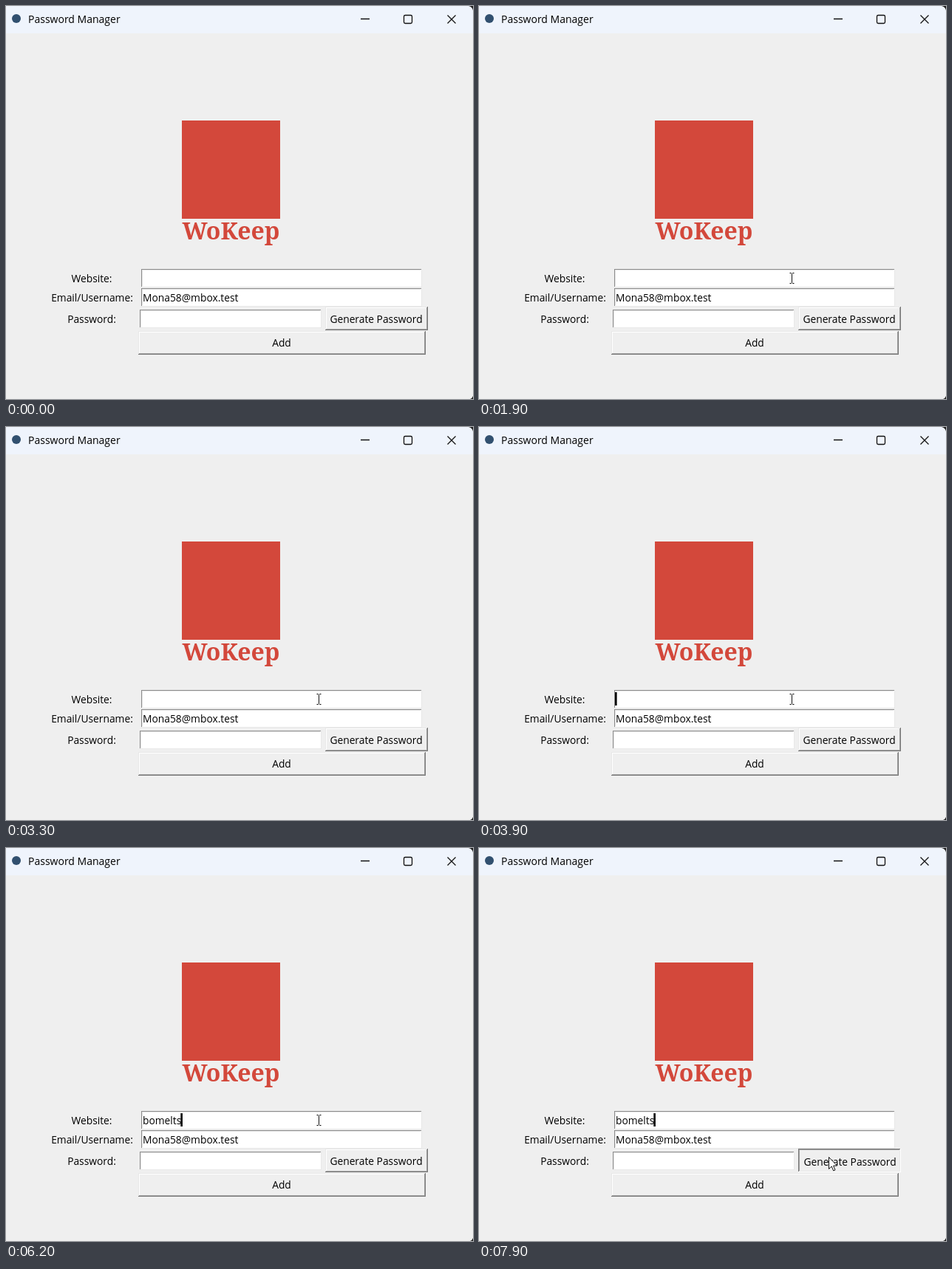
Recreate the animation shown at these times as an HTML page. Size 632 px wide and 532 px high, loop 8000 ms.

```html
<!DOCTYPE html>
<html lang="en">
<head>
<meta charset="utf-8">
<title>Password Manager</title>
<style>
html, body { margin: 0; width: 632px; height: 532px; overflow: hidden; background: #efefef; }
svg { display: block; font: 13.8px "Open Sans", "Noto Sans", sans-serif; }
.mid { text-anchor: middle; }
.brand { font: bold 32px "Noto Serif", serif; fill: #d3483b; }
.icon { fill: none; stroke: #111; stroke-width: 1.3; }
</style>
</head>
<body>
<svg width="632" height="532" viewBox="0 0 632 532">
  <rect width="632" height="532" fill="#efefef"/>
  <rect width="632" height="37" fill="#eff4fc"/>
  <path d="M626 0H632V6Q631 1 626 0ZM632 528V532H628Q631 531 632 528Z" fill="#222"/>
  <circle cx="14" cy="17" r="6" fill="#31506f"/>
  <text x="30" y="23" font-size="14">Password Manager</text>
  <path class="icon" d="M480 17.5H492M597.5 12.5L608.5 23.5M608.5 12.5L597.5 23.5"/>
  <rect class="icon" x="538.5" y="12.5" width="11" height="11" rx="1.8"/>

  <rect x="238" y="155" width="133" height="133" fill="#d3483b"/>
  <text class="mid brand" x="304.5" y="316">WoKeep</text>

  <g class="mid">
    <text x="116" y="374">Website:</text>
    <text x="116.5" y="400">Email/Username:</text>
    <text x="116" y="429">Password:</text>
  </g>
  <g id="widgets"></g>
  <g id="pressed"></g>
  <text x="185" y="400">Mona58@mbox.test</text>
  <text id="site" x="185" y="374"></text>
  <rect id="caret" y="359" width="2.6" height="18"/>
  <text class="mid" x="373" y="461">Add</text>
  <text id="generate" class="mid" x="501" y="429">Generate Password</text>

  <path id="arrow" d="M0 0V16L3.7 12.5L6.2 18.3L8.5 17.3L6.1 11.6H11Z" fill="#fff" stroke="#111"/>
  <path id="beam" d="M-3 -7H-1L0 -6L1 -7H3M0 -6V6M-3 7H-1L0 6L1 7H3" fill="none" stroke="#111"/>
</svg>
<script>
const $ = id => document.getElementById(id);
const LOOP = 8000, FOCUS = 3850, PRESS = 7700;
const WORD = "bomelts";
const KEYS = [4300, 4500, 4700, 4900, 5100, 5700, 6000];
// Pointer stops: time, x, y
const PATH = [[900, 500, 290], [1100, 431, 347], [1500, 423, 368],
              [6800, 423, 368], [7400, 473, 418]];

// Two-pixel bevel: colours run outer top-left, inner top-left, inner bottom-right, outer bottom-right
function bevel(x, y, w, h, fill, [a, b, c, d]) {
  const box = (l, t, r, u, color) =>
    `<rect x="${x + l}" y="${y + t}" width="${w - l - r}" height="${h - t - u}" fill="${color}"/>`;
  return box(0, 0, 0, 0, d) + box(0, 0, 1, 1, a) + box(1, 1, 1, 1, c) +
         box(1, 1, 2, 2, b) + box(2, 2, 2, 2, fill);
}
const FIELD = ["#8c8c8c", "#e8e8e8", "#fff", "#e8e8e8"];
const RAISED = ["#e8e8e8", "#fff", "#a0a0a0", "#787878"];
const SUNKEN = ["#787878", "#a0a0a0", "#e8e8e8", "#fff"];

const generateButton = style => bevel(432, 407, 139, 32, "#efefef", style);
$("widgets").innerHTML =
  bevel(183, 356, 380, 25, "#fff", FIELD) +
  bevel(183, 382, 380, 25, "#fff", FIELD) +
  bevel(181, 411, 246, 25, "#fff", FIELD) +
  bevel(179, 440, 389, 32, "#efefef", RAISED) +
  generateButton(RAISED);
$("pressed").innerHTML = generateButton(SUNKEN);

const show = (id, on) => $(id).setAttribute("visibility", on ? "visible" : "hidden");

function pointer(t) {
  const i = PATH.findIndex(p => p[0] > t);
  if (i < 0) return PATH.at(-1).slice(1);
  const [t0, x0, y0] = PATH[Math.max(i - 1, 0)], [t1, x1, y1] = PATH[i];
  const k = t1 > t0 ? (t - t0) / (t1 - t0) : 0, e = k * k * (3 - 2 * k);
  return [x0 + (x1 - x0) * e, y0 + (y1 - y0) * e];
}

function draw(t) {
  $("site").textContent = WORD.slice(0, KEYS.filter(k => k <= t).length);
  $("caret").setAttribute("x", 184 + $("site").getComputedTextLength());
  show("caret", t >= FOCUS && (t - FOCUS) % 900 < 600);

  const down = t >= PRESS;
  show("pressed", down);
  $("generate").setAttribute("transform", down ? "translate(1 1)" : "");

  const [x, y] = pointer(t);
  const field = (y >= 357 && y < 406 && x < 563) || (y >= 411 && y < 436 && x < 427);
  show("arrow", t >= 900 && !field);
  show("beam", t >= 900 && field);
  for (const id of ["arrow", "beam"])
    $(id).setAttribute("transform", `translate(${Math.round(x) + 0.5} ${Math.round(y) + 0.5})`);
}

const start = performance.now();
function frame() {
  const t = (performance.now() - start) % LOOP;
  draw(Math.floor(t / 100) * 100);
  requestAnimationFrame(frame);
}
frame();
</script>
</body>
</html>
```
